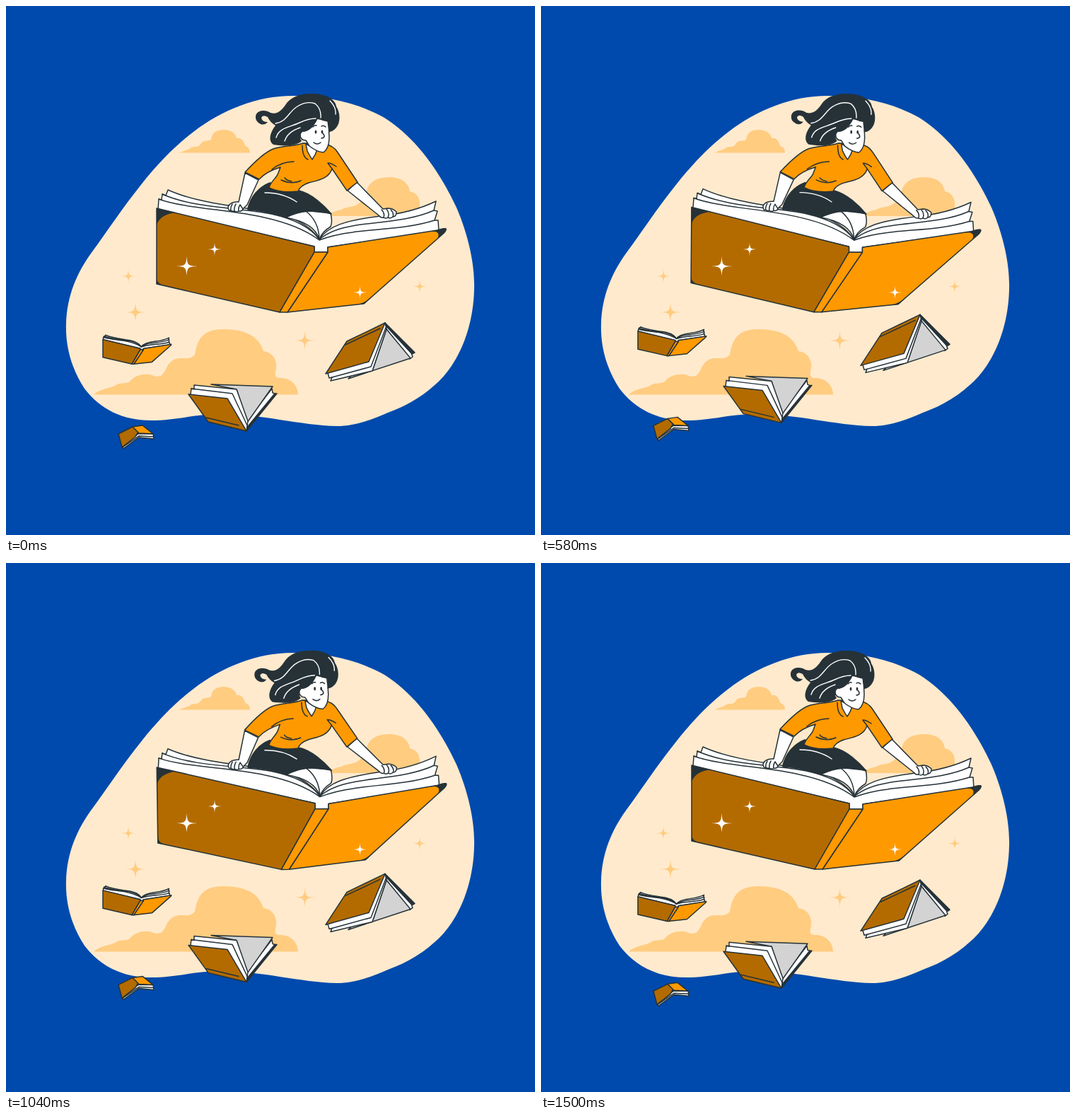
An HTML page for the animation above (1.54 s loop, 748 px wide and 748 px high).

```html
<!DOCTYPE html>
<html lang="en">
<head>
<meta charset="utf-8">
<title>Flying books</title>
<style>
  html, body { margin: 0; height: 100%; overflow: hidden; background: #004aad; }
  svg { display: block; width: 100vw; height: 100vh; }
  path { vector-effect: non-scaling-stroke; }
  .ink { stroke: #263238; stroke-width: 1.5; stroke-linejoin: round; stroke-linecap: round; }
  .sky { fill: #ffeacd; }
  .white { fill: #fff; }
  .orange { fill: #f90; }
  .brown { fill: #b36b00; }
  .gray { fill: #d3d3d3; }
  .dark { fill: #263238; }
  .peach { fill: #ffcc80; }
  .line { fill: none; }
  .shine { fill: none; stroke: #fff; stroke-width: 1.4; stroke-linecap: round; }
</style>
</head>
<body>
<svg viewBox="0 0 748 748">
  <defs>
    <path id="star" d="M0-1C.05-.12 .12-.05 1 0C.12 .05 .05 .12 0 1C-.05 .12-.12 .05-1 0C-.12-.05-.05-.12 0-1"/>
    <g id="book" class="ink">
      <path class="white" d="M215 288L216 273L220 274L221 266L226 268L229 260C262 275 305 281 345 287C395 291 428 307 443 330C455 311 480 303 530 297Q575 292 608 276L605 289L610 290L606 303L611 303L612 318L455 341V348H436V340Z"/>
      <path class="line" d="M221 266C265 286 330 285 375 294Q425 305 443 330M216 273C250 286 320 288 365 299Q415 310 443 331M605 289C570 305 520 305 490 311Q460 316 443 330M606 303C565 316 520 315 490 320Q465 323 443 331"/>
      <path class="brown" d="M213 286L436 340V348L387 433L213 393Z"/>
      <path class="orange" d="M455 341L610 317Q622 313 622 316Q622 319 617 323L506 421L398 433L455 348Z"/>
      <path class="orange" d="M436 348H455L398 433H387Z"/>
    </g>
  </defs>

  <path class="sky" d="M405 127C455 127 500 138 535 158C580 187 612 232 637 285C655 327 663 368 662 400C661 455 640 508 605 537C585 555 562 567 540 575C515 586 492 594 468 594C415 593 365 577 300 577C268 577 240 586 205 586C165 586 133 570 111 541C92 512 84 480 85 450C86 410 100 378 120 350C145 316 165 285 190 254C215 222 240 197 265 178C305 147 355 127 405 127Z"/>
  <g class="peach">
    <path d="M245 207.600C254 203 258 204 262 200C268 198 272 201 276 194C280 189 286 192 290 189C291 178 299 175 308 175C318 175 325 180 326 187C333 185 337 192 338 198C343 199 345 203 345 207.600Z"/>
    <path d="M452 297C462 291 468 289 474 288C483 283 490 285 496 281Q506 276 510 262C513 247 527 242 542 242C558 242 569 249 571 262C580 264 585 270 585 280V297Z"/>
    <path d="M124 549.600C133 541 146 541 154 537C161 532 163 535 174 532C181 523 190 521 197 521C207 519 208 526 219 523C228 517 225 505 240 499C252 496 258 502 267 493C270 478 273 457 307 457C340 457 358 468 364 488C379 490 383 503 382 511C381 520 378 524 386 526C402 525 413 536 413 549.600Z"/>
    <use href="#star" transform="translate(183 433) scale(14.5)"/>
    <use href="#star" transform="translate(173 382) scale(10)"/>
    <use href="#star" transform="translate(422.500 473) scale(14.5)"/>
    <use href="#star" transform="translate(585 396.500) scale(10)"/>
  </g>

  <g id="rider">
    <use href="#book"/>
    <path class="dark" d="M213 286L240 292Q217 295 213 310ZM213 385Q214 393 225 396L213 393ZM599 319L622 314Q625 316 617 323L610 329Q616 317 599 319ZM498 422L507 421L518 411Q510 418 498 422Z"/>
    <g class="ink">
      <path class="white" d="M395 299Q412 290 430 290L459 293Q462 305 459 312Q447 319 443 330Q436 306 395 299Z"/>
      <path class="line" d="M424 290Q442 304 443 329"/>
      <path class="dark" d="M342 286C346 270 357 256 373 250L414 261C432 265 450 282 460 294Q440 288 420 291Q408 293 396 299C380 294 362 289 342 288Z"/>
      <path class="white" d="M338 236L329 277Q317 276 314 284Q314 290 318 289Q320 291 323 290Q326 292 329 290Q334 291 335 287L341 281L357 246ZM483 261L527 296Q530 300 534 299Q537 301 540 299Q544 301 547 298Q552 298 552 291Q547 286 540 286L533 287L496 249Z"/>
      <path class="line" d="M320 280Q317 285 318 289M325 280Q322 285 323 290M331 281Q328 285 329 290M331 281L335 287M531 288Q536 293 534 299M538 287Q543 293 540 299M544 288Q549 293 547 298"/>
      <path class="orange" d="M338 235C350 222 365 207 378 202C393 197 405 199 420 194L450 195Q463 197 469 207L497 249L482 261L461 230C456 246 437 247 428 250Q416 254 413 262Q388 265 372 257C374 248 383 243 385 236L388 228Q368 234 358 245Z"/>
      <path class="line" d="M376 231Q390 220 407 220M389 246Q404 253 417 247M394 243Q397 247 404 248M461 230L455 222Q460 222 467 227"/>
      <path class="white" d="M424 195L426 205Q430 213 433 217Q438 210 440 203Z"/>
      <path class="line" d="M419 197Q419 214 427 217"/>
      <path class="white" d="M422 177Q434 174 439 159L455 162Q457 175 457 186Q457 201 449 207Q439 206 429 198L424 190Q416 190 416 182Q416 176 422 177Z"/>
    </g>
    <path class="dark" d="M456 164Q448 163 441 159C435 172 427 177 419 178Q413 184 418 191C409 199 391 198 378 196C370 190 374 178 381 169Q373 164 370 157Q363 153 361 158Q362 164 370 164Q366 169 360 167Q352 163 353 156C354 147 367 146 374 151C384 154 390 147 395 140C402 128 418 123 434 124C452 124 466 132 467 142C473 151 473 165 467 172Q462 178 456 178Z"/>
    <path class="shine" d="M381 166C397 164 400 149 412 142Q425 134 437 138Q446 145 445 158M382 186C386 172 400 172 415 165Q428 159 438 159M394 191Q398 178 416 172M458 134Q467 143 466 153M366 264Q392 264 411 277"/>
    <path class="ink line" d="M434 171Q436 168 439 169M446 170Q449 168 452 171M448 180Q453 186 446 187M435 193Q440 197 445 193"/>
    <g class="dark">
      <ellipse cx="438" cy="178" rx="1.4" ry="2.6"/>
      <ellipse cx="447" cy="178" rx="1.4" ry="2.6"/>
    </g>
  </g>
  <g class="white">
    <use href="#star" transform="translate(255.500 368) scale(14.5)"/>
    <use href="#star" transform="translate(295 344) scale(9.5)"/>
    <use href="#star" transform="translate(500.500 405) scale(9.5)"/>
  </g>

  <g id="flock" class="ink">
    <use href="#book" transform="translate(86.600 403.800) scale(.2366)"/>

    <path class="dark" d="M536 448L578 490L575 492L537 452Z"/>
    <path class="white" d="M537 452L573 491L575 496L571 499L538 457Z"/>
    <path class="gray" d="M538 457L572 498L484 527L490 521L519 513Z"/>
    <path class="white" d="M536 448L538 457L518 516L459 530L461 525L457 526L455 519Z"/>
    <path class="line" d="M461 525L516 510L537 455"/>
    <path class="brown" d="M482 474L536 448L513 503L452 520Z"/>
    <path class="line" d="M480 479L529 456"/>

    <path class="dark" d="M380 548L383 548L340 601L339 597Z"/>
    <path class="white" d="M376 541L377 547L380 548L339 598V589Z"/>
    <path class="gray" d="M290 535L377 538L341 589L326 542Z"/>
    <path class="white" d="M266 536L326 542L342 587L340 601L261 549L262 541L266 542Z"/>
    <path class="line" d="M262 541L320 548L341 593"/>
    <path class="brown" d="M258 549L313 555L340 601L286 588Z"/>
    <path class="line" d="M283 582L329 593"/>

    <path class="white" d="M164 622L187 605L208 605L209 612L188 610L166 626Z"/>
    <path class="line" d="M165 624L188 608L208 609"/>
    <path class="brown" d="M159 605L179 595L187 602L183 609L164 624Z"/>
    <path class="orange" d="M179 595L193 593L208 605L188 604Z"/>
  </g>
</svg>
<script>
  const LOOP = 1540;
  const rider = document.getElementById('rider');
  const flock = document.getElementById('flock');

  // Linear interpolation through [time, value] keys.
  function track(keys, t) {
    const i = keys.findIndex(key => key[0] > t);
    if (i < 0) return keys[keys.length - 1][1];
    const [t0, a] = keys[i - 1], [t1, b] = keys[i];
    return a + (b - a) * (t - t0) / (t1 - t0);
  }

  const tilt = [[0, 0], [365, 1.05], [735, 0], [1120, -1.05], [1500, 0]];
  const lift = [[0, 0], [730, -14.6], [1500, 0.3]];

  function draw(now) {
    const t = now % LOOP;
    rider.setAttribute('transform', `rotate(${track(tilt, t)} 415 272)`);
    flock.setAttribute('transform', `translate(0 ${track(lift, t)})`);
    requestAnimationFrame(draw);
  }
  draw(0);
</script>
</body>
</html>
```
